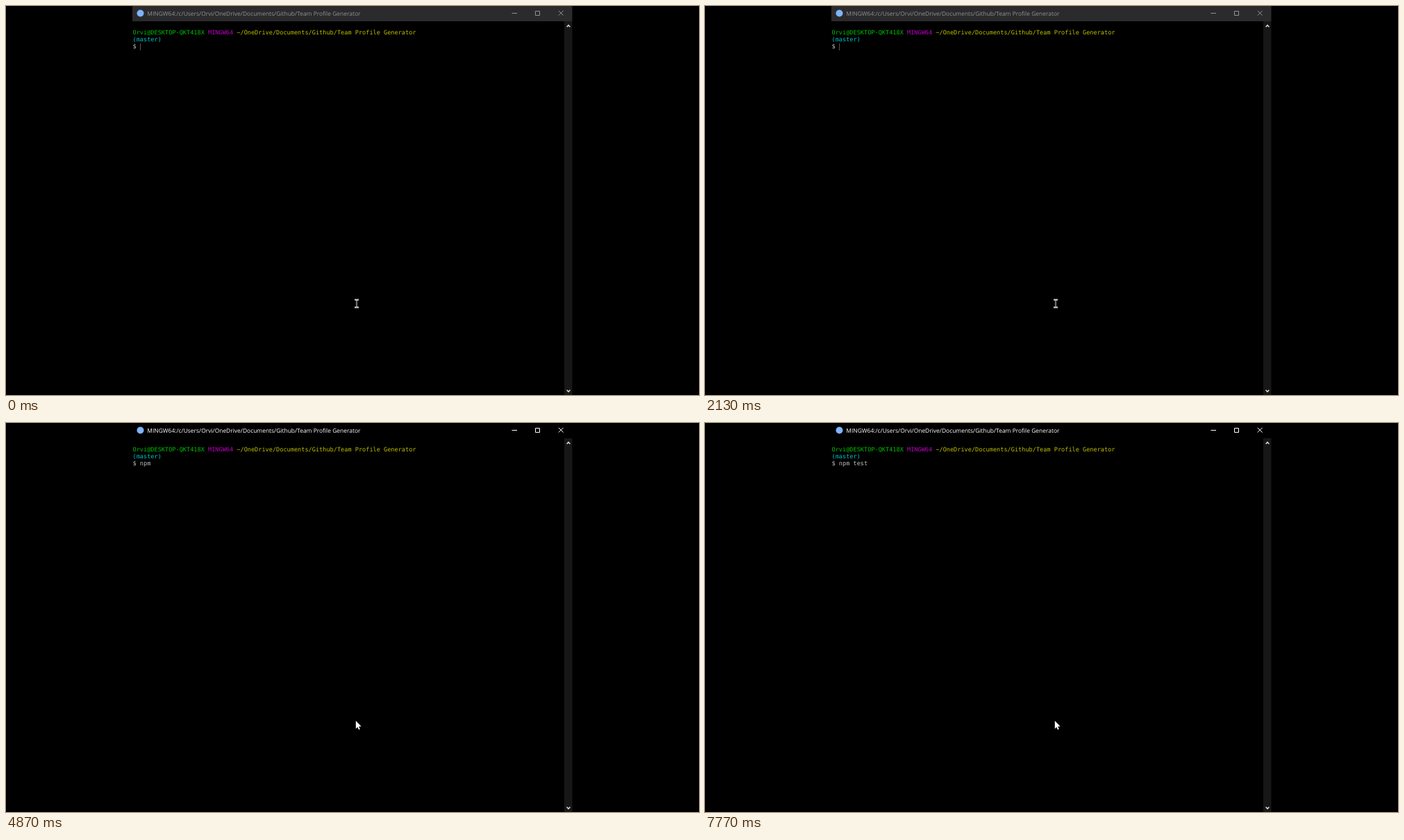
An HTML page that plays this animation: 998x561 px, repeating every 8 s.

```html
<!DOCTYPE html>
<html lang="en">
<head>
<meta charset="utf-8">
<title>Terminal</title>
<style>
  html, body { margin: 0; width: 100%; height: 100%; overflow: hidden; background: #000; }
  svg { display: block; width: 998px; height: 561px; }
  text { white-space: pre; text-rendering: geometricPrecision; }
  .shell { font: 8.58px "DejaVu Sans Mono", monospace; fill: #bfbfbf; }
  #bar { --ink: #fff; --back: #000; }
  #bar.inactive { --ink: #929292; --back: #2b2b2d; }
  #bar rect { fill: var(--back); }
  #bar text { font: 8.45px "Open Sans", sans-serif; fill: var(--ink); }
  #bar path { fill: none; stroke: var(--ink); }
  .arrows { fill: none; stroke: #d8d8d8; stroke-width: 1.5; }
</style>
</head>
<body>
<svg viewBox="0 0 998 561">
  <g id="bar">
    <rect x="182" width="633.5" height="22"/>
    <circle cx="193.5" cy="10.5" r="5" fill="#80b3ff"/>
    <text x="203.3" y="13.8">MINGW64:/c/Users/Orvi/OneDrive/Documents/Github/Team Profile Generator</text>
    <path d="M728.5 10.5h7.5M762.5 7.5h6v6h-6zM795.8 6.8l6.8 6.8M802.6 6.8l-6.8 6.8"/>
  </g>

  <rect x="804" y="22" width="11.5" height="539" fill="#171717"/>
  <path class="arrows" d="M807.6 30.3l2.4-2.6 2.4 2.6M807.6 553.7l2.4 2.6 2.4-2.6"/>

  <g class="shell">
    <text x="182.5" y="40.7"><tspan fill="#00bf00">Orvi@DESKTOP-QKT418X</tspan> <tspan fill="#bf00bf">MINGW64</tspan> <tspan fill="#bfbf00">~/OneDrive/Documents/Github/Team Profile Generator</tspan></text>
    <text x="182.5" y="51.1" fill="#00bfbf">(master)</text>
    <text x="182.5" y="61.4" id="prompt">$ </text>
  </g>
  <rect id="caret" width="1" height="10"/>

  <g id="beam" fill="none">
    <path d="M502 423.7h2.2l.8.7.8-.7h2.2M502 434.7h2.2l.8-.7.8.7h2.2M505 424v10.5" stroke="#c4c4c4" stroke-width="2.2"/>
    <path d="M505 425v8.5" stroke="#000" stroke-width=".9"/>
  </g>
  <path id="arrow" fill="#fff" d="M503.8 429.5v11.4l2.5-2.4 1.7 3.7 1.8-.8-1.7-3.6 3.5-.2z"/>
</svg>
<script>
  const LOOP = 8000, FOCUS = 3030, POINTER = 3930, ENTER = 7200;
  const COMMAND = "npm test";
  const keyTimes = [4200, 4270, 4330, 5730, 5800, 5870, 6030, 6330];
  const caretOff = [[3600, 4170], [4870, 5370], [6870, ENTER], [7770, LOOP]];
  const LEFT = 182.6, CHAR = 5.165, LINE = 10.4;

  const el = id => document.getElementById(id);
  const show = (id, on) => el(id).setAttribute("visibility", on ? "visible" : "hidden");

  function draw(t) {
    const typed = keyTimes.filter(k => t >= k).length;
    const entered = t >= ENTER;
    const column = entered ? 0 : typed + 2;

    el("bar").classList.toggle("inactive", t < FOCUS);
    el("prompt").textContent = "$ " + COMMAND.slice(0, typed);

    const caret = el("caret");
    caret.setAttribute("x", Math.round(LEFT + CHAR * column));
    caret.setAttribute("y", entered ? 54 + LINE : 54);
    caret.setAttribute("fill", t < FOCUS ? "#644a4a" : "#bfbfbf");
    show("caret", !caretOff.some(([from, to]) => t >= from && t < to));

    show("beam", t < POINTER);
    show("arrow", t >= POINTER);
  }

  function tick() {
    draw(performance.now() % LOOP);
    requestAnimationFrame(tick);
  }
  tick();
</script>
</body>
</html>
```
